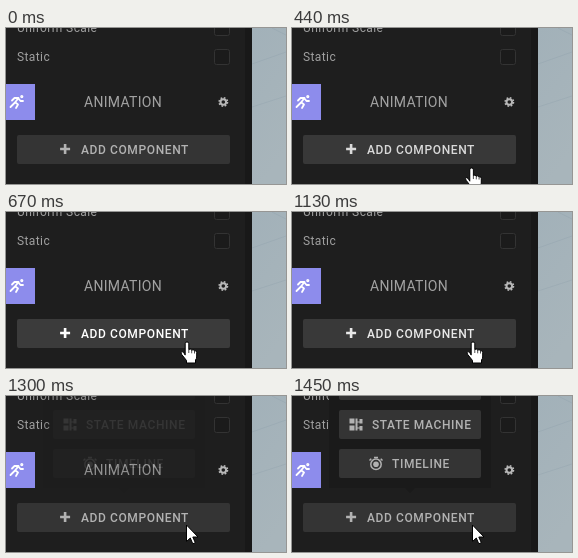
Write an HTML page that moves like this. It is 280 by 156 pixels and loops after 2140 ms.

```html
<!DOCTYPE html>
<html lang="en">
<head>
<meta charset="utf-8">
<style>
  html, body { margin: 0; width: 100%; height: 100%; overflow: hidden; background: #1e1e1e; }
  svg { display: block; width: 280px; height: 156px; }
  text { font: 12px Roboto, sans-serif; letter-spacing: .4px; fill: #a0a0a0; }
  .caps { font-weight: 500; letter-spacing: .6px; fill: #b2b2b2; }
  .title { font-size: 14px; letter-spacing: .3px; fill: #a2a2a2; }
  .box { fill: #1b1b1b; stroke: #333; }
  .item { fill: #343434; }
  .icon { fill: #b2b2b2; }
  .line { fill: none; stroke: #b2b2b2; stroke-width: 1.5; }
  .cursor { fill: #fff; stroke: #000; stroke-linejoin: round; }
</style>
</head>
<body>
<svg viewBox="0 0 280 156">
  <defs>
    <linearGradient id="sky" x2=".3" y2="1">
      <stop stop-color="#a2b1b9"/>
      <stop offset="1" stop-color="#a8b5bb"/>
    </linearGradient>
  </defs>

  <rect width="280" height="156" fill="#1e1e1e"/>
  <rect x="239" width="7" height="156" fill="#181818"/>
  <rect x="246" width="34" height="156" fill="url(#sky)"/>
  <path d="M246 36L280 24M246 79L280 68M266 0L280 7" fill="none" stroke="#8c9da8" stroke-opacity=".35"/>

  <text x="11" y="4">Uniform Scale</text>
  <text x="11" y="33">Static</text>
  <rect class="box" x="208.5" y="-7.5" width="15" height="15" rx="2"/>
  <rect class="box" x="208.5" y="21.5" width="15" height="15" rx="2"/>

  <rect y="56" width="29" height="36" fill="#8d8cec"/>
  <g fill="none" stroke="#fff" stroke-width="1.8" stroke-linecap="round" stroke-linejoin="round">
    <path d="M6 72.500L8.500 70H12.500L9 74.500L4.500 79M12.500 70.500L14.500 73H17M9.500 74.500L12 76.500L10 80"/>
    <circle cx="15.800" cy="68.600" r=".7"/>
  </g>
  <text class="title" x="78" y="79">ANIMATION</text>
  <g transform="translate(217.3 74)" fill="none" stroke="#b8b8b8">
    <circle r="2.8" stroke-width="2"/>
    <circle r="4.2" stroke-width="1.6" stroke-dasharray="1.7 1.599"/>
  </g>

  <rect id="button" x="11" y="107" width="213" height="29" rx="2"/>
  <g id="label">
    <path d="M57.8 116h2.6v3.700h3.700v2.600h-3.700v3.700h-2.600v-3.700h-3.700v-2.600h3.700z"/>
    <text class="caps" x="75" y="126" style="fill:inherit">ADD COMPONENT</text>
  </g>

  <g id="menu">
    <path d="M37 0H199V92H123L118 97L113 92H37Z" fill="#1a1a1a"/>
    <rect class="item" x="47" y="-25" width="142" height="29" rx="2"/>
    <rect class="item" x="47" y="14" width="142" height="29" rx="2"/>
    <rect class="item" x="47" y="53" width="142" height="29" rx="2"/>
    <path class="icon" d="M57.5 22.5h5v5h-5zM57.5 29.5h5v5h-5zM63.5 22.5h2v3h2v-2.5h3v4.500h-3v-1h-2v5h2v-1.500h3v4.500h-3v-2h-2v2h-2z"/>
    <text class="caps" x="80" y="33">STATE MACHINE</text>
    <circle class="line" cx="84" cy="68.3" r="5.2"/>
    <path class="line" d="M82 61.500H86M79.300 62.700L77.500 64.500M88.700 62.700L90.500 64.500"/>
    <circle class="icon" cx="84" cy="68.300" r="2.800"/>
    <text class="caps" x="100" y="72">TIMELINE</text>
  </g>

  <path id="arrow" class="cursor" d="M0 0V16.500L3.800 13L6.300 18.800L8.800 17.700L6.300 12H11.500Z"/>
  <g id="hand" class="cursor">
    <path d="M-1.800 13V2.200a1.800 1.800 0 0 1 3.600 0V8q1.600-1.200 2.900.6q1.600-1 2.800.6q2.200-.6 2.200 1.800v4.500q0 1.500-1.200 3v3h-9v-2.500l-5-6.300q-1.200-2 .5-2.600q1.600-.2 3.200 3.500z"/>
    <path d="M1.800 8v3.500M4.700 8.600v3.200M7.500 9.200v2.800" fill="none" stroke-width=".7"/>
  </g>
</svg>
<script>
  const LOOP = 2140;
  const STEPS = [0, 290, 360, 430, 520, 590, 670, 1130, 1220, 1300, 1380, 1450];
  const $ = id => document.getElementById(id);
  const ramp = (t, from, to) => Math.min(1, Math.max(0, (t - from) / (to - from)));
  const mix = (a, b, k) => a + (b - a) * k;
  const gray = v => `rgb(${v},${v},${v})`;
  const show = (el, on) => el.setAttribute('visibility', on ? 'visible' : 'hidden');

  function draw(now) {
    const clock = now % LOOP;
    const t = STEPS.filter(s => s <= clock).pop();

    // The pointer rises onto the button and slows to a stop.
    const rise = 1 - (1 - ramp(t, 290, 670)) ** 1.7;
    const x = mix(179, 181, rise ** 2);
    const y = mix(151.5, 129.5, rise);
    const overButton = t >= 430 && t < 1220;
    $('hand').setAttribute('transform', `translate(${x} ${y})`);
    $('arrow').setAttribute('transform', `translate(${x - .5} ${y - .5})`);
    show($('hand'), overButton);
    show($('arrow'), t >= 290 && !overButton);

    const hover = ramp(t, 360, 500) * (1 - ramp(t, 1070, 1270));
    $('button').setAttribute('fill', gray(Math.round(mix(52, 59, hover))));
    $('label').setAttribute('fill', gray(Math.round(mix(178, 255, hover))));
    $('menu').setAttribute('opacity', ramp(t, 1260, 1450) ** 1.2);
  }

  function frame() {
    draw(performance.now());
    requestAnimationFrame(frame);
  }
  frame();
</script>
</body>
</html>
```
